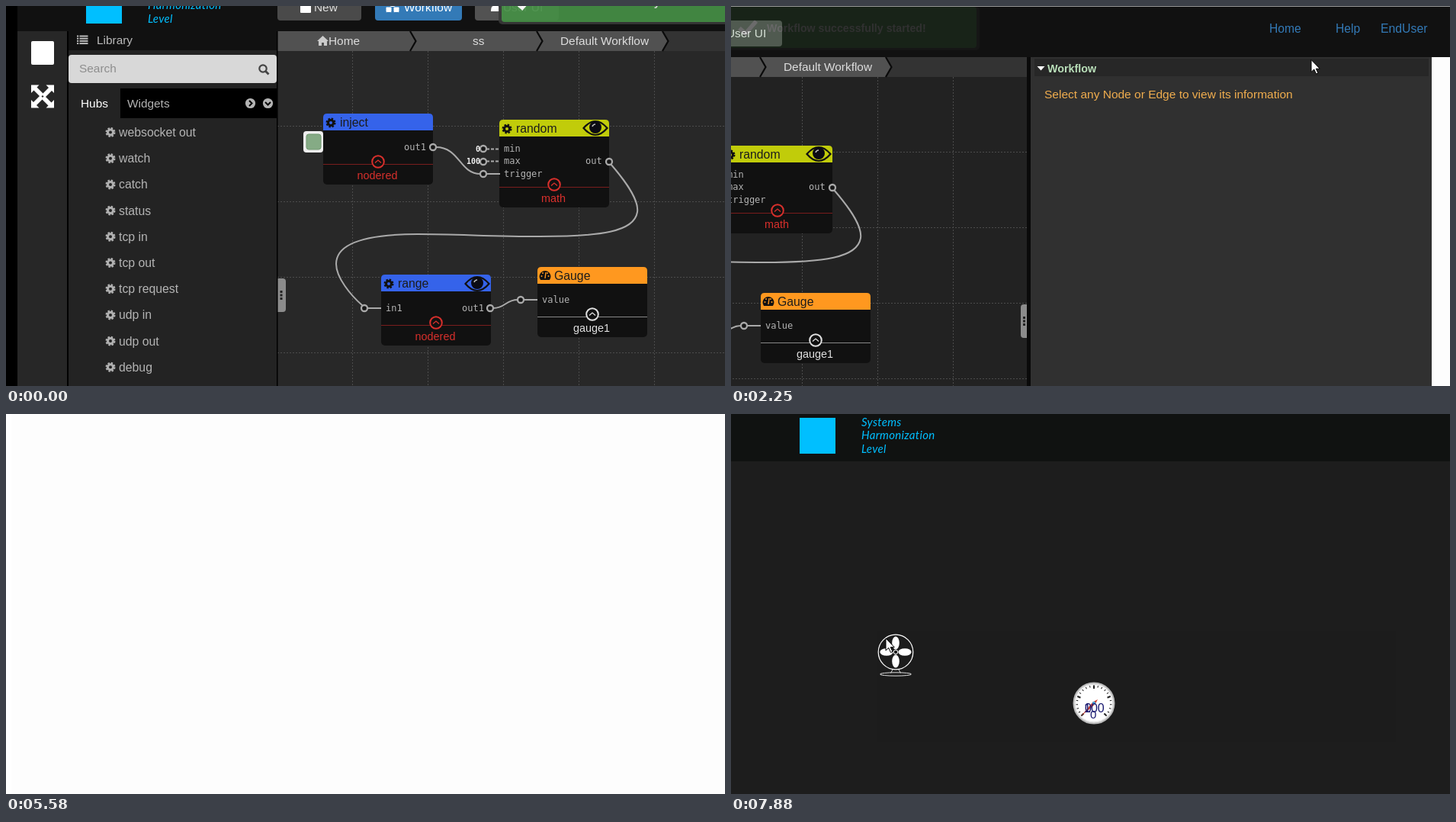
Write an HTML page that moves like this. It is 943 by 498 pixels and loops after 8000 ms.

```html
<!DOCTYPE html>
<html lang="en">
<head>
<meta charset="utf-8">
<title>Workflow editor</title>
<style>
html, body { margin: 0; width: 100%; height: 100%; overflow: hidden; background: #fdfdfd; }
svg { display: block; width: 100vw; height: 100vh; font-family: "Liberation Sans", Arial, sans-serif; }
text { white-space: pre; }
.mono { font-family: "DejaVu Sans Mono", monospace; }
.bar { font-family: "Open Sans", "Noto Sans CJK SC", "Noto Sans CJK", sans-serif; }
.brand { font-family: Lato, sans-serif; font-style: italic; letter-spacing: .3px; }
</style>
</head>
<body>
<svg id="stage" viewBox="0 0 943 498" xmlns="http://www.w3.org/2000/svg"></svg>
<script>
const LOOP = 8000;
const BLUE = '#3563ea', YELLOW = '#c1cc0a', ORANGE = '#ff981f', RED = '#d8302c', GREY = '#aaa', CYAN = '#00bfff';

// drawing helpers
const rect = (x, y, w, h, fill, r = 0, more = '') =>
  `<rect x="${x}" y="${y}" width="${w}" height="${h}" rx="${r}" fill="${fill}" ${more}/>`;
const circle = (x, y, r, fill, more = '') => `<circle cx="${x}" cy="${y}" r="${r}" fill="${fill}" ${more}/>`;
const line = (d, color, w = 1, more = '') => `<path d="${d}" fill="none" stroke="${color}" stroke-width="${w}" ${more}/>`;
const shape = (d, fill, more = '') => `<path d="${d}" fill="${fill}" ${more}/>`;
const label = (x, y, s, fill, size = 15.4, more = '') =>
  `<text x="${x}" y="${y}" fill="${fill}" font-size="${size}" ${more}>${s}</text>`;
const group = (x, y, body, more = '') => `<g transform="translate(${x} ${y})" ${more}>${body}</g>`;
const range = (n, f) => Array.from({ length: n }, (_, i) => f(i)).join('');
const MIDDLE = 'text-anchor="middle"', END = 'text-anchor="end"', BOLD = 'font-weight="bold"';

// icons
const gear = (x, y, color) => group(x, y,
  circle(0, 0, 3.5, 'none', `stroke="${color}" stroke-width="3"`) +
  circle(0, 0, 5.3, 'none', `stroke="${color}" stroke-width="2.4" stroke-dasharray="2.4 1.763"`));
const eye = (x, y) => group(x, y,
  line('M-15.5 0Q0 -18 15.5 0Q0 18 -15.5 0Z', '#111', 2.2) + circle(0, -1, 8, '#0b0b14') +
  line('M-4 -2Q-3 -5 0 -5', '#bbb', 1.6));
const lens = (x, y, color) => group(x, y,
  circle(-1, -1, 4.7, 'none', `stroke="${color}" stroke-width="2.2"`) + line('M2.5 2.5L6.5 6.5', color, 2.8));
const dial = (x, y) => group(x, y,
  shape('M-6 6A7.5 7.5 0 1 1 6 6Z', '#111') +
  [[-4.5, 1], [-3, -3], [3, -3], [4.5, 1]].map(p => circle(...p, 1, ORANGE)).join('') +
  line('M0 4L1 -4', ORANGE, 1.4));
const user = (x, y) => circle(x, y - 4, 3.4, '#fff') + shape(`M${x - 6} ${y + 6}q0 -7 3 -7h6q3 0 3 7z`, '#fff');
const arrow = shape('M0 0V16L3.7 12.5L6.5 18.5L9 17.5L6.3 11.7H11.3Z', '#fff', 'stroke="#000" stroke-linejoin="round"');

// the brand block, shared by both pages
const brand = rect(90, 5, 47, 47, CYAN) +
  ['Systems', 'Harmonization', 'Level'].map((s, i) =>
    label(171, 16 + i * 17.3, s, CYAN, 15, 'class="brand"')).join('');

// workflow nodes
function node(x, y, h, color, title, foot, footColor, lineColor, icon) {
  const b = y + h, cx = x + 72;
  return rect(x, y, 144, h, '#111', 5) +
    shape(`M${x} ${y + 22}v-17q0 -5 5 -5h134q5 0 5 5v17z`, color) +
    (icon === 'dial' ? dial(x + 10, y + 11) : gear(x + 10, y + 12, '#111')) +
    label(x + 22, y + 17, title, '#1c1c1c', 15.8) +
    line(`M${x} ${b - 26.5}h144`, lineColor) +
    circle(cx, b - 30, 7.8, '#111', `stroke="${footColor}" stroke-width="2"`) +
    line(`M${cx - 4} ${b - 28.5}l4 -3.5l4 3.5`, footColor, 1.3) +
    label(cx - 1, b - 7, foot, footColor, 14.4, MIDDLE);
}
const port = (x, y) => circle(x, y, 4, '#161616', `stroke="${GREY}" stroke-width="2.3"`);
const mono = (x, y, s, more = '') => label(x, y, s, '#b4b4b4', 12, `class="mono" ${more}`);
const wire = d => line(d, GREY, 2);

function workflow() {
  const red = '#7a1d1d';
  return wire('M564 185C595 185 595 220 622 220') +
    wire('M793 207C818 236 830 256 828 270C824 296 780 302 700 302C640 302 590 299 540 299C480 299 433 308 433 338C433 356 452 379 468 393') +
    wire('M639 396C655 396 655 385 671 385') +
    rect(390, 164, 26, 28, '#eee', 4) + rect(394, 168, 19, 20, '#85ab85', 3, 'stroke="#6f966f"') +
    node(416, 141, 93, BLUE, 'inject', 'nodered', RED, red) +
    node(647, 149, 115, YELLOW, 'random', 'math', RED, red) + eye(773, 160) +
    node(492, 352, 93, BLUE, 'range', 'nodered', RED, red) + eye(618, 364) +
    node(697, 342, 92, ORANGE, 'Gauge', 'gauge1', '#e0e0e0', '#888', 'dial') +
    wire('M630 220H648M474 396H492M679 385H697') +
    line('M630 187.5H648M630 203.5H648', GREY, 2, 'stroke-dasharray="4 2"') +
    [[560, 185], [626, 187], [626, 204], [626, 220], [791, 204], [470, 396], [635, 396], [675, 385]]
      .map(p => port(...p)).join('') +
    mono(522, 189, 'out1') + mono(653, 191, 'min') + mono(653, 207, 'max') + mono(653, 224, 'trigger') +
    mono(760, 207, 'out') + mono(498, 400, 'in1') + mono(598, 400, 'out1') + mono(703, 389, 'value') +
    [['0', 191], ['100', 207]].map(([s, y]) =>
      label(622, y, s, '#eee', 10, `class="mono" ${BOLD} ${END}`)).join('');
}

function sidebar() {
  const items = ['websocket out', 'watch', 'catch', 'status', 'tcp in', 'tcp out', 'tcp request', 'udp in', 'udp out', 'debug'];
  const corner = a => `<path d="M15 -15v10.5l-3 -3l-9 9l-4 -4l9 -9l-3.5 -3.5z" fill="#fff" transform="rotate(${a})"/>`;
  return rect(0, -34, 15, 540, '#000') + rect(15, 33, 65, 470, '#272727') + rect(80, 33, 2, 470, '#000') +
    rect(82, 33, 273, 470, '#232323') + rect(355, 33, 1.5, 470, '#000') +
    rect(33, 46, 30, 31, '#fff', 2) + group(48, 118.5, [0, 90, 180, 270].map(corner).join('')) +
    rect(82, 33, 273, 25, '#111') +
    range(4, i => rect(93, 38.5 + i * 3.2, 2.2, 2, '#bbb') + rect(96.5, 38.5 + i * 3.2, 11, 2, '#bbb')) +
    label(119, 50, 'Library', '#bbb') +
    rect(82, 64, 273, 37, '#d8d8d8', 4) + label(96, 87, 'Search', '#8d8d8d') + lens(338, 83, '#444') +
    rect(150, 108, 205, 39, '#000') + label(98, 133, 'Hubs', '#fff') + label(159, 133, 'Widgets', '#b4b4b4') +
    circle(320.5, 127.5, 6.6, '#b4b4b4') + line('M319 124l3.5 3.5l-3.5 3.5', '#000', 2) +
    circle(343.5, 127.5, 6.6, '#b4b4b4') + line('M340 126l3.5 3.5l3.5 -3.5', '#000', 2) +
    items.map((s, i) => gear(137, 165.5 + i * 34.2, '#b0b0b0') +
      label(148, 171 + i * 34.2, s, '#b4b4b4', 15.8)).join('');
}

function crumbs() {
  const cut = x => line(`M${x} 33l7.5 13l-7.5 13`, '#0a0a0a', 2.2);
  return rect(356, 33, 690, 26, '#333') + shape('M356 33H860l8 13l-8 13H356z', '#515151') +
    [530, 696, 861].map(cut).join('') +
    shape('M408 46l7.5 -7l7.5 7h-2v6h-4v-4h-3v4h-4v-6z', '#ccc') +
    label(423, 51, 'Home', '#ddd') + label(612, 51, 'ss', '#ddd') + label(727, 51, 'Default Workflow', '#ddd');
}

function header() {
  return rect(15, -33, 1700, 66, '#111') +
    group(15, -29, brand) +
    rect(356, -15, 110, 34, '#4a4a4a', 4) + rect(386, -5, 14, 14, '#fff', 1) + label(404, 7, 'New', '#ddd') +
    rect(484, -15, 114, 34, '#337ab7', 4) +
    [[507, -2], [502, 5], [512, 5]].map(([x, y]) => rect(x - 4, y - 4, 8, 7.5, '#fff', 1.5, 'stroke="#337ab7"')).join('') +
    label(522, 7, 'Workflow', '#fff') +
    rect(615, -15, 110, 34, '#525252', 4) + user(642, 1) + label(652, 7, 'User UI', '#eee');
}

// right-hand part: browser bar, links, info panel and notice
function rightSide() {
  return rect(-547, 0, 1700, 27, '#f4f4f4') + rect(-547, 27, 1700, 1, '#999') +
    label(101, 17, 'ostLedge : Projects', '#333', 12, `class="bar" ${END}`) +
    shape('M117.5 6.5h6l3.5 3.5v9.5h-9.5z', '#fff', 'stroke="#777"') + line('M123.5 6.5v3.5h3.5', '#777') +
    label(135, 17, '中国科学技术大学-就', '#333', 12, 'class="bar"') +
    circle(272, 13, 6, '#d92020') +
    label(285, 17, '2026新芽秋日集会_大', '#333', 12, 'class="bar"') +
    shape('M931.5 8.5h5l1.5 2h7v8h-13.5z', '#f8d978', 'stroke="#c79c3c"') +
    label(802, 62, 'Home', '#337ab7', 15.6) + label(889, 62, 'Help', '#337ab7', 15.6) + label(948, 62, 'EndUser', '#337ab7', 15.8) +
    rect(484, 94, 5, 500, '#0a0a0a') + rect(489, 94, 526, 500, '#292929', 0, 'id="panel"') +
    rect(494, 96, 517, 23, '#272727') + rect(1015, 94, 200, 500, '#fdfdfd') +
    shape('M497.5 106h10l-5 5.5z', '#fff') + label(511, 114, 'Workflow', '#b9dfb9', 14.3, BOLD) +
    label(507, 148, 'Select any Node or Edge to view its information', '#f0ad4e', 15.5) +
    `<g id="notice">${rect(84, 28, 338, 57, '#383838', 5) + rect(88, 28, 330, 54, '#468f46', 4) +
      line('M107 56l8 7l14 -16', '#fff', 5.5) +
      label(143, 61, 'Workflow successfully started!', '#e8e8e8', 14.2, BOLD)}</g>`;
}

function editor() {
  const dots = (x, y) => range(3, i => rect(x, y + i * 4.5, 3, 3, '#222'));
  const grid = 'M454.5 59V560M553.5 59V560M652.5 59V560M751.5 59V560M850.5 59V560M949.5 59V560' +
    'M356 157.5H1046M356 256.5H1046M356 355.5H1046M356 454.5H1046';
  return rect(356, 33, 690, 500, '#282828', 0, 'id="canvas"') +
    line(grid, '#4c4c4c', 1, 'stroke-dasharray="2 2"') + workflow() +
    shape('M356 357h7q4 0 4 4v36q0 4 -4 4h-7z', '#8c8c8c') + dots(359.5, 373) +
    shape('M1046 357h-4q-4 0 -4 4v36q0 4 4 4h4z', '#8c8c8c') + dots(1041, 373) +
    crumbs() + header() + sidebar() + group(562, -61, rightSide());
}

function appList() {
  return rect(0, 62, 943, 48, '#fefefe') + rect(0, 110, 943, 388, '#e6e6e6') +
    rect(533.5, 68.5, 399, 36, '#fff', 4, 'stroke="#ccc"') +
    shape('M902 69h26q4 0 4 4v27q0 4 -4 4h-26z', '#dcdcdc') + lens(917, 87, '#444') +
    rect(939.5, 68.5, 40, 36, '#fff', 4, 'stroke="#ccc"') +
    label(548, 91, 'Search', '#999') + label(75, 148, 'My App', '#333', 26.2) +
    rect(66, 169, 877, 1, '#c8c8c8');
}

function widgets() {
  const blade = i => `<ellipse cx="0" cy="-12" rx="4.8" ry="8.6" fill="#fff" transform="rotate(${i * 90})"/>`;
  const tick = i => `<path d="M0 -23.5v${i % 5 ? 2.5 : 4.5}" stroke="#222" stroke-width="${i % 5 ? 1 : 2}" transform="rotate(${-135 + i * 13.5})"/>`;
  return rect(192, 285, 680, 145, '#1c1c1c') +
    group(216, 312, circle(0, 0, 22.8, 'none', 'stroke="#fff" stroke-width="1.2"') + range(4, blade) +
      circle(0, 0, 2.8, '#1d1d1d', 'stroke="#fff"') + line('M-4 23l-2.5 4.5M4 23l2.5 4.5', '#ddd') +
      `<ellipse cx="0" cy="29" rx="20.5" ry="2.2" fill="none" stroke="#ddd"/>`) +
    group(476, 379, circle(0, 0, 26.5, '#f8f8f8', 'stroke="#bbb" stroke-width="2"') +
      circle(0, 0, 24.7, '#fff', 'stroke="#ddd"') + range(21, tick) +
      shape('M-17 17L-1.5 -1.5L5 -5L1.5 1.5Z', '#d0402f') + circle(0, 0, 2.2, '#4aa3d8') +
      label(-13, 12, '100', '#191970', 16) + label(-12, 12, '0', '#191970', 16) +
      label(-5, 20, '0', '#191970', 15));
}

const stage = document.getElementById('stage');
stage.innerHTML =
  `<g id="editor">${editor()}</g>` +
  `<g id="blank">${rect(0, 0, 943, 498, '#fdfdfd') + rect(0, 0, 943, 1, '#8c8c8c', 0, 'id="edge"') +
    rect(0, 0, 7, 498, '#fff', 0, 'id="margin"')}</g>` +
  `<g id="app">${rect(0, 0, 943, 62, '#101211') + brand}<g id="list">${appList()}</g>` +
  `<g id="dark">${rect(0, 62, 943, 436, '#1d1d1d')}<g id="widgets">${widgets()}</g></g></g>` +
  `<g id="cursor">${arrow}</g>`;
const el = {};
stage.querySelectorAll('[id]').forEach(e => el[e.id] = e);

// the picture only changes at these moments
const seq = (a, b, n) => Array.from({ length: n }, (_, i) => Math.round(a + (b - a) * i / (n - 1)));
const ticks = [0, ...seq(120, 770, 5), 940, 1120, ...seq(1320, 2250, 7), 2390, 2510,
  ...seq(2970, 3980, 7), ...seq(4100, 5060, 8), ...seq(5210, 5580, 3),
  ...seq(6410, 7340, 8), ...seq(7470, 7880, 4)];

function track(t, keys) {
  const i = keys.findIndex(k => k[0] > t);
  if (i === 0) return keys[0][1];
  if (i < 0) return keys[keys.length - 1][1];
  const [t0, a] = keys[i - 1], [t1, b] = keys[i];
  return a + (b - a) * (t - t0) / (t1 - t0);
}
const panX = [[0, 0], [770, -562], [1120, -625], [1630, -658]];
const panY = [[0, 0], [610, 61], [770, 61], [1120, 50], [1630, 34]];
const mouseX = [[1475, 640], [2250, 761], [2390, 820], [2510, 877], [2970, 877], [4100, 313.5], [5060, 60], [6410, 215], [7340, 203]];
const mouseY = [[1475, -30], [2250, 70.5], [2390, 52], [2510, 28], [2970, 28], [3980, 4], [4100, -.5], [4650, -25], [6410, -30], [7340, 294]];
const move = (e, x, y) => e.setAttribute('transform', `translate(${x} ${y})`);
const show = (e, on) => e.setAttribute('display', on ? 'inline' : 'none');
const tone = (e, v) => e.setAttribute('fill', `rgb(${v},${v},${v})`);

function draw(time) {
  const t = ticks.filter(k => k <= time).pop();
  show(el.editor, t < 2970);
  show(el.blank, t >= 2970 && t < 6410);
  show(el.edge, t < 5060);
  show(el.margin, t >= 5210);
  show(el.app, t >= 6410);
  show(el.list, t < 7470);
  show(el.dark, t >= 7470);
  show(el.widgets, t >= 7740);
  move(el.editor, Math.round(track(t, panX)), Math.round(track(t, panY)));
  move(el.cursor, track(t, mouseX), track(t, mouseY));
  el.notice.setAttribute('opacity', track(t, [[1320, .92], [2250, .14]]));
  tone(el.canvas, Math.round(track(t, [[1320, 40], [2250, 34]])));
  tone(el.panel, Math.round(track(t, [[1320, 41], [2250, 48]])));
}

const start = performance.now();
function tick() {
  draw((performance.now() - start) % LOOP);
  requestAnimationFrame(tick);
}
tick();
</script>
</body>
</html>
```
